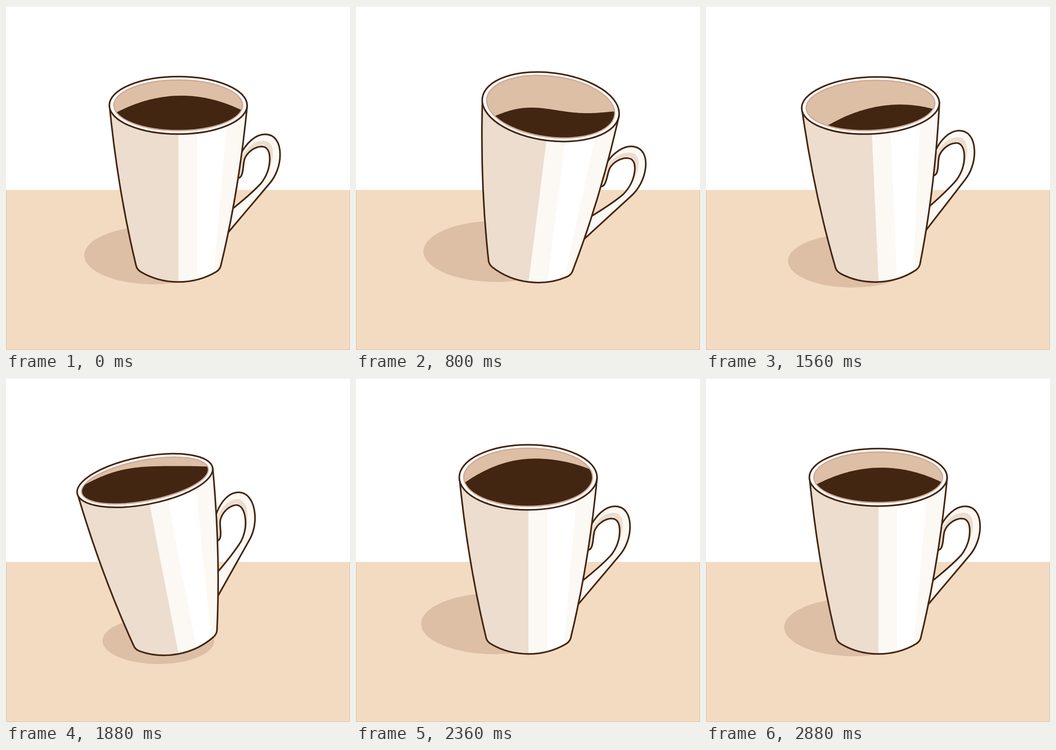
Recreate the animation shown at these times as an HTML page. Size 748 by 748 pixels, loop 4 s.

```html
<!DOCTYPE html>
<html lang="en">
<head>
<meta charset="utf-8">
<title>Swirling coffee</title>
<style>
  html, body { margin: 0; width: 100%; height: 100%; overflow: hidden; background: #fff; }
  svg { display: block; width: 100%; height: 100%; }
  .line { fill: none; stroke: #422612; stroke-width: 3.5; stroke-linejoin: round; }
  .cream { fill: #fcf8f4; }
  .beige { fill: #ecddce; }
  .tan { fill: #ddbfa6; }
</style>
</head>
<body>
<svg viewBox="0 0 748 748">
  <defs>
    <path id="body" d="M225 216Q243 400 283 565Q285 573 293 578Q330 600 375 600Q420 600 457 578Q465 573 467 565Q507 400 524.5 216Z"/>
    <path id="handle" d="M510 323C522 298 543 279 563 279C585 279 596 297 596 323C596 348 586 371 573 386L480 496L490 443C515 423 537 405 555 385C568 368 573.500 350 573.500 332C573.500 315 567 305.500 556 305.500C540 306 525 318 519 332C515 345 517 354 513 366C511 372 508 375 502 374Z"/>
    <clipPath id="inBody"><use href="#body"/></clipPath>
    <clipPath id="inHandle"><use href="#handle"/></clipPath>
    <clipPath id="inRim"><ellipse id="well" cx="374.5" cy="216" rx="139"/></clipPath>
  </defs>

  <rect y="400" width="748" height="348" fill="#f3dbc1"/>
  <path d="M0 .5H748" stroke="#e6e6e6"/>
  <path d="M.5 400V747.500H747.500V400" fill="none" stroke="#d6bfa6"/>
  <ellipse id="shadow" class="tan" rx="151" ry="63"/>

  <g id="cup">
    <use href="#handle" class="cream"/>
    <path class="beige" clip-path="url(#inHandle)" d="M500 380L514 325C528 302 545 293 560 293C575 293 582 307 580 325Q578 345 570 362L560 300L519 334L517 380Z"/>
    <use href="#handle" class="line"/>

    <g clip-path="url(#inBody)">
      <rect class="beige" x="200" y="200" width="175" height="410"/>
      <rect class="cream" x="375" y="200" width="160" height="410"/>
      <path fill="#fff" d="M415.500 200H485L449 610H415.500Z"/>
    </g>
    <use href="#body" class="line"/>

    <ellipse id="rim" cx="374.5" cy="216" rx="149.800" fill="#fff"/>
    <ellipse id="lining" class="tan" cx="374.5" cy="216" rx="140" stroke="#cfac99" stroke-width="3"/>
    <g clip-path="url(#inRim)"><path id="coffee" fill="#422612"/></g>
    <ellipse id="edge" class="line" cx="374.5" cy="216" rx="149.800"/>
  </g>
</svg>
<script>
  const LOOP = 4000, STEP = 40, START = 520, STOP = 2720;

  // Each track lists the turning points of one part: time in ms, then its values.
  const tilt = [[START, 0], [800, 7.3], [1040, 8.85], [2025, -12.1], [2550, 5.1], [STOP, 0]];
  const rimHeight = [[START, 62.5], [1000, 80.5], [1940, 51.5], [2550, 76.5], [STOP, 62.5]];

  // centre x and scale
  const shade = [[START, 321, 1], [1040, 294, 1.1], [1950, 332, .8], [2500, 294, 1.1], [STOP, 321, 1]];

  // level, bow, lean and ripple of the coffee's far edge
  const still = [-21, 36, -3.5, 0];
  const wave = [
    [START, ...still],
    [800, 5.5, 14, -9.5, 9.6],
    [1280, 25, 15, -29, 4],
    [1560, 5.5, 36, -33, 0],
    [1880, -30, 22, -22, 4],
    [STOP, -41, 50, -8.5, 0],
    [2880, ...still]
  ];

  // Speed at key i: zero at the ends and wherever the motion turns.
  function slope(keys, i, k) {
    const a = keys[i - 1], b = keys[i], c = keys[i + 1];
    if (!a || !c || (b[k] - a[k]) * (c[k] - b[k]) <= 0) return 0;
    return (c[k] - a[k]) / (c[0] - a[0]);
  }

  // Cubic easing from key to key.
  function sample(keys, t) {
    const next = keys.findIndex(key => key[0] > t);
    if (next < 1) return keys.at(next).slice(1);
    const from = keys[next - 1], to = keys[next];
    const span = to[0] - from[0], p = (t - from[0]) / span, q = 1 - p;
    return from.slice(1).map((value, n) => {
      const k = n + 1;
      return value * q * q * (1 + 2 * p) + to[k] * p * p * (3 - 2 * p)
        + span * p * q * (q * slope(keys, next - 1, k) - p * slope(keys, next, k));
    });
  }

  function coffeePath([level, bow, lean, ripple]) {
    let d = 'M-160 130';
    for (let x = -160; x <= 160; x += 4) {
      const u = x / 140;
      d += `L${x} ${level + bow * u * u + lean * u + ripple * Math.sin(Math.PI * u)}`;
    }
    return d + 'L160 130Z';
  }

  const set = (id, name, value) => document.getElementById(id).setAttribute(name, value);

  function draw() {
    const t = Math.floor(performance.now() % LOOP / STEP) * STEP;
    const [angle] = sample(tilt, t);
    const [ry] = sample(rimHeight, t);
    const [x, scale] = sample(shade, t);
    set('cup', 'transform', `rotate(${angle} 375 600)`);
    set('shadow', 'transform', `translate(${x} ${542 - 150 * (scale - 1)}) scale(${scale})`);
    set('rim', 'ry', ry);
    set('edge', 'ry', ry);
    set('lining', 'ry', ry - 7.5);
    set('well', 'ry', ry - 9);
    set('coffee', 'transform', `translate(374.5 216) rotate(${-angle})`);
    set('coffee', 'd', coffeePath(sample(wave, t)));
    requestAnimationFrame(draw);
  }
  draw();
</script>
</body>
</html>
```
